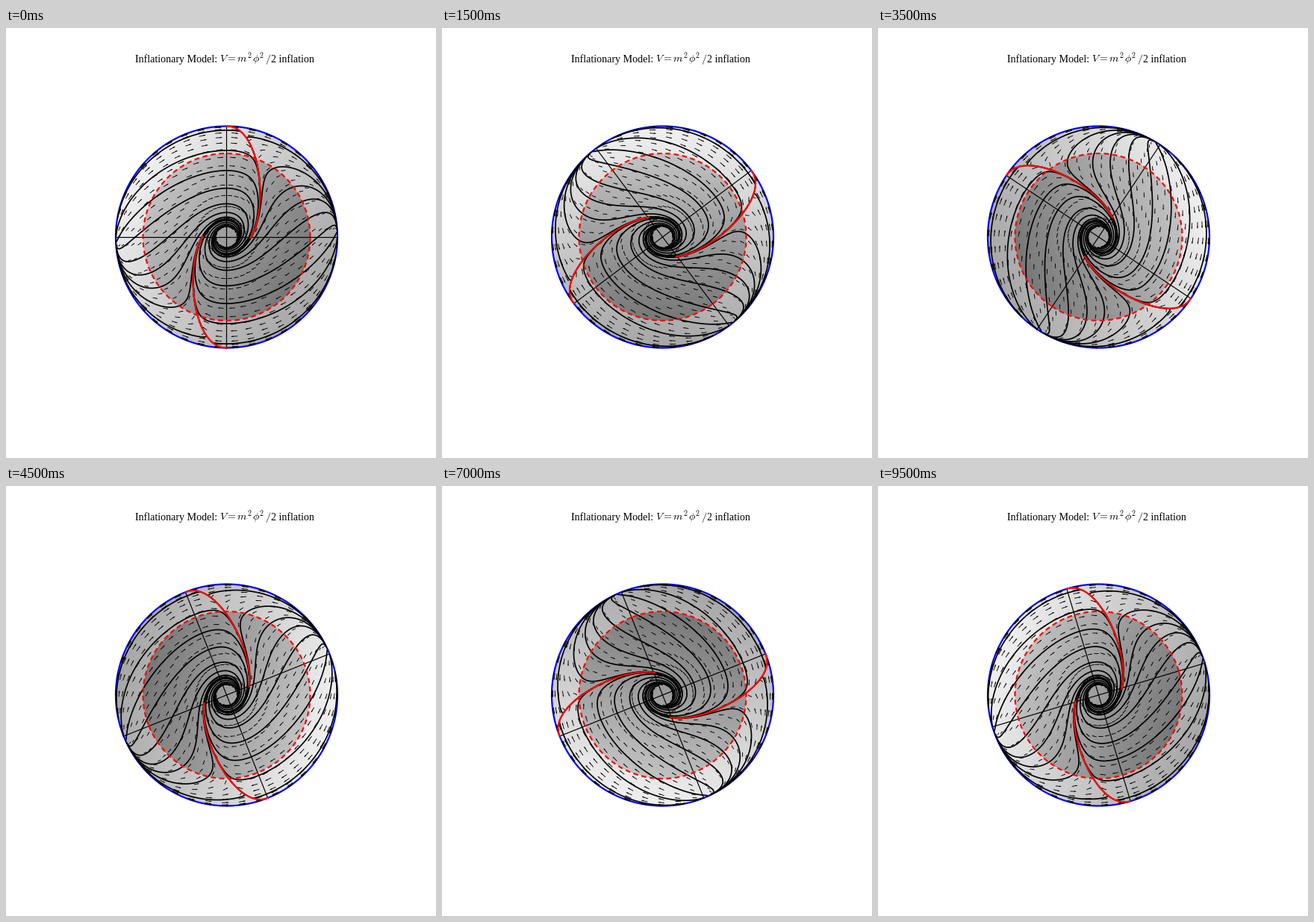
Animation, 576 px wide and 576 px high, one loop 10 s. Source, as a matplotlib script:

```python
import numpy as np
import matplotlib.pyplot as plt
from matplotlib.animation import FuncAnimation
from matplotlib.collections import LineCollection, PolyCollection
from matplotlib.patches import Circle
from matplotlib.transforms import Affine2D

SIZE = 576
CX, CY = 295.5, 280
RADIUS = 148.5
INNER = 112
FRICTION = 2.55      # Hubble friction in the rescaled field equations
POWER = 2.2          # compactification r = p / (1 - p^n)^(1/n)

plt.rcParams["mathtext.fontset"] = "cm"
fig = plt.figure(figsize=(8, 8), dpi=72, facecolor="white")
ax = fig.add_axes([0, 0, 1, 1])
ax.axis("off")
spin = Affine2D()
moving = spin + ax.transData


def flow(rho, psi):
    """Radial and tangential velocity on the unit disc, field axis upward."""
    theta = psi - np.pi / 2
    s, c = np.sin(theta), np.cos(theta)
    gap = np.clip(1 - rho ** POWER, 0, 1)
    radial = -FRICTION * rho ** 2 * gap * s * s
    angular = -gap ** (1 / POWER) - FRICTION * rho * s * c
    return radial, rho * angular


def velocity(p):
    rho, psi = np.hypot(*p), np.arctan2(p[1], p[0])
    a, b = flow(rho, psi)
    c, s = np.cos(psi), np.sin(psi)
    v = np.array([a * c - b * s, a * s + b * c])
    return v / (np.hypot(*v) + 1e-9)


def trace(start, sign=1, stop=0.094, step=0.0015, limit=3500):
    p = np.array(start, float)
    path = [p]
    for _ in range(limit):
        mid = p + sign * step / 2 * velocity(p)
        p = p + sign * step * velocity(mid)
        rho = np.hypot(*p)
        if rho < stop or rho > 0.9985:
            break
        path.append(p)
    return np.array(path)


def with_mirror(paths):
    return [RADIUS * sign * p for p in paths for sign in (1, -1)]


def add_lines(paths, color, width, z):
    ax.add_collection(LineCollection(paths, colors=color, linewidths=width,
                                     capstyle="round", transform=moving,
                                     zorder=z), autolim=False)


# Shaded disc with a darker inner region
grid = np.linspace(-150, 150, 301)
X, Y = np.meshgrid(grid, grid)
light = np.radians(145)
slope = (X * np.cos(light) + Y * np.sin(light)) / RADIUS
for shade, r in ((203 + 37 * slope, RADIUS), (157 + 50 * slope, INNER)):
    image = ax.imshow(shade, cmap="gray", vmin=0, vmax=255, origin="lower",
                      extent=(-150, 150, -150, 150), interpolation="bilinear",
                      zorder=1)
    image.set_transform(moving)
    image.set_clip_path(Circle((0, 0), r, transform=ax.transData))

# Direction arrows on a hemisphere grid seen from above
chi, psi = np.meshgrid(np.radians(np.linspace(10, 88, 14)),
                       np.radians(np.arange(4.5, 360, 9)))
chi, psi = chi.ravel(), psi.ravel()
rho = np.sin(chi)
vr, vt = flow(rho, psi)
vr = vr / np.cos(chi)
norm = np.hypot(vr, vt)
vr, vt = vr / norm * np.cos(chi), vt / norm
length = 8.5 * (0.45 + 0.55 * rho)
spot = RADIUS * np.column_stack([rho * np.cos(psi), rho * np.sin(psi)])
aim = np.column_stack([vr * np.cos(psi) - vt * np.sin(psi),
                       vr * np.sin(psi) + vt * np.cos(psi)])
half = aim * length[:, None] / 2
side = np.column_stack([-half[:, 1], half[:, 0]])
add_lines(np.stack([spot - half, spot + half], axis=1), "black", 0.9, 3)
heads = np.stack([spot + half, spot + half * 0.4 + side * 0.22,
                  spot + half * 0.4 - side * 0.22], axis=1)
ax.add_collection(PolyCollection(heads, facecolors="black", linewidths=0,
                                 transform=moving, zorder=3), autolim=False)

# Rim, region border and the field axes
turn = np.linspace(0, 2 * np.pi, 361)
ring = np.column_stack([np.cos(turn), np.sin(turn)])
add_lines([RADIUS * ring], "blue", 2.2, 2)
ax.plot(*(INNER * ring).T, color="red", lw=2.2, ls=(0, (3, 2.1)),
        dash_capstyle="butt", transform=moving, zorder=5)
add_lines([[(-RADIUS, 0), (RADIUS, 0)], [(0, -RADIUS), (0, RADIUS)]],
          "black", 1.2, 4)

# Trajectories
seeds = [(0, 0.963), (0, 0.781), (0, 0.6), (0, 0.44), (0, 0.3),
         (0.48, 0.825), (0.444, 0.626), (0.6, 0.45), (0.66, 0.31)]
curves = [np.vstack([trace(s, -1)[::-1], trace(s)]) for s in seeds]
add_lines(with_mirror(curves), "black", 1.7, 4)

# Inflationary attractor: slow-roll curve near the rim, then the full flow
rim = 1 - 0.06 * np.linspace(0, 1, 60) ** 2
tilt = np.arctan((1 - rim ** POWER) ** (1 / POWER) / (FRICTION * rim))
slow_roll = np.column_stack([rim * np.sin(tilt), rim * np.cos(tilt)])
attractor = np.vstack([slow_roll, trace(slow_roll[-1], stop=0.215)])
add_lines(with_mirror([attractor]), "red", 2.2, 6)

# Title
BASE = CY - 46
for x, words, align in ((173, "Inflationary Model:", "left"),
                        (286, "$V{=}m^2$", "left"),
                        (330, r"$\phi^2$", "left"),
                        (355, "$/$", "right"),
                        (413, "2 inflation", "right")):
    ax.text(x - CX, BASE, words, ha=align, va="baseline", fontsize=14,
            family="Liberation Serif", color="black")

ax.set_aspect("auto")
ax.set_xlim(-CX, SIZE - CX)
ax.set_ylim(CY - SIZE, CY)

# Clockwise view angles, from camera positions rounded to one decimal
view = [(0, 1), (0.3, 1), (0.6, 0.9), (0.8, 0.6), (1, 0.4)]
quarter = [np.degrees(np.arctan2(x, y)) for x, y in view]
last = [0] + [90 - a for a in quarter[:0:-1]]
angles = [90 * n + a for n in range(3) for a in quarter] + \
         [270 + a for a in last]


def draw(i):
    spin.clear().rotate_deg(-angles[i % len(angles)])
    return []


anim = FuncAnimation(fig, draw, frames=len(angles), interval=500,
                     repeat=True, blit=False)
plt.show()
```
